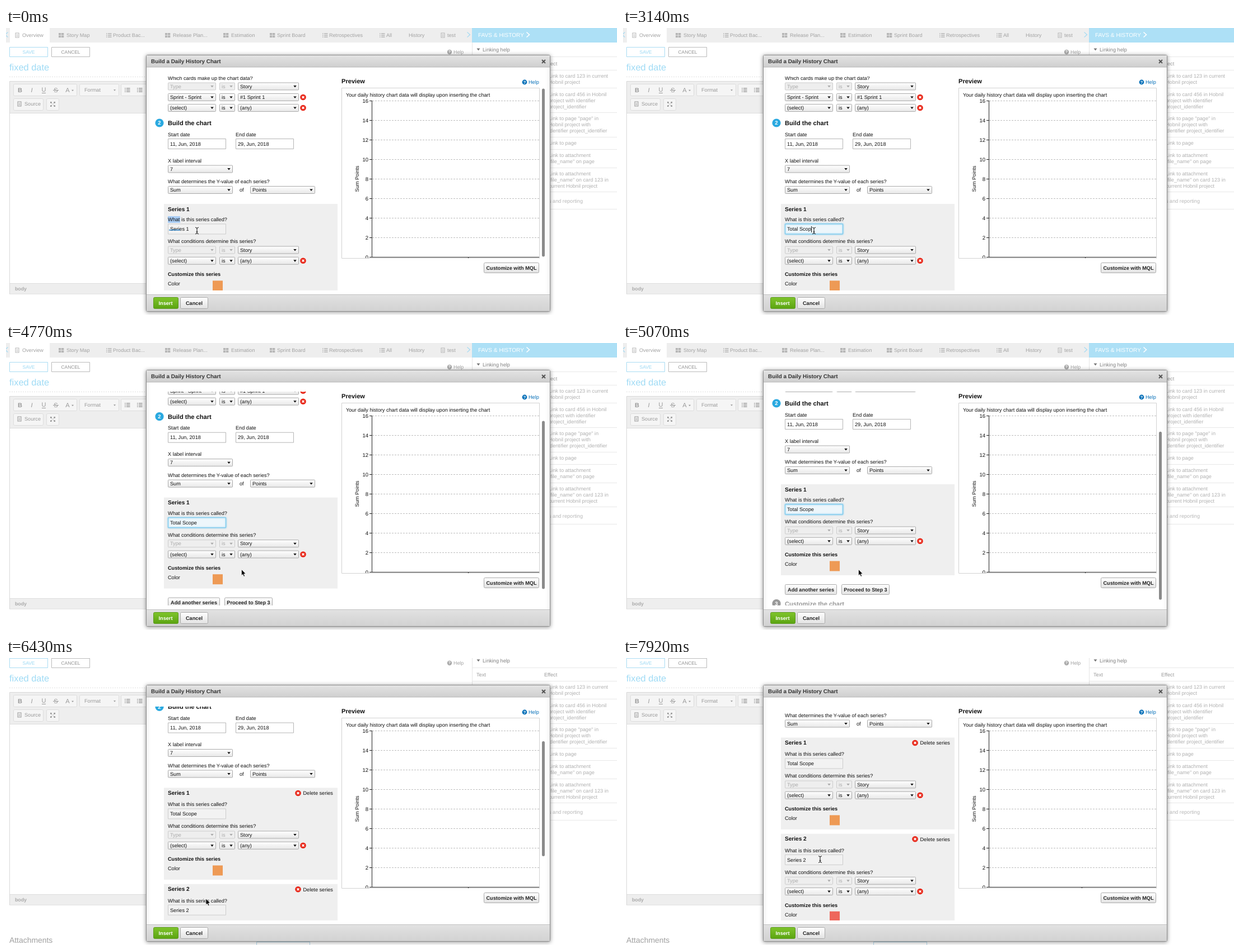
Write an HTML page with a canvas that moves like this. It is 1091 by 514 pixels and loops after 8 s.

```html
<!DOCTYPE html>
<html lang="en">
<head>
<meta charset="utf-8">
<title>Daily history chart builder</title>
<style>
html, body { margin: 0; width: 100%; height: 100%; overflow: hidden; background: #fff; }
canvas { display: block; width: 1091px; height: 514px; }
</style>
</head>
<body>
<canvas id="stage"></canvas>
<script>
const W = 1091, H = 514, LOOP = 8000;
const canvas = document.getElementById('stage');
const dpr = window.devicePixelRatio || 1;
canvas.width = W * dpr;
canvas.height = H * dpr;
const c = canvas.getContext('2d');
const FACE = '"Liberation Sans", Arial, sans-serif';
const SIZE = 9.17, TOOL = 'Hobnil';

// Step tracks: [time, value...]; each value holds until the next time.
const SCROLL = [[0, 0], [4180, 24.5], [4330, 32], [4470, 36.5], [4770, 38.3], [4920, 48], [5070, 62],
  [5220, 71], [5520, 73.7], [6430, 82.5], [6580, 104], [6730, 134], [6880, 159], [7030, 172.5]];
const BAR = [[0, 1], [150, .5], [330, 0], [4180, 1], [5670, .6], [5820, .25], [5970, 0],
  [6430, 1], [7320, .6], [7470, .25], [7620, 0]];
const NAME = [[0, 'Series 1'], [1520, 'T'], [1820, 'Tot'], [2110, 'Tota'], [2250, 'Total'], [2400, 'Total '],
  [2700, 'Total S'], [2990, 'Total Sc'], [3140, 'Total Scop'], [3290, 'Total Scope']];
const CARET = [[0, 0], [330, 1], [620, 0], [1520, 1], [3580, 0], [5520, 1], [6130, 0]];
const POINTER = [[0, 341, 363, 'beam'], [3580, 362, 382, 'arrow'], [3730, 400, 400, 'arrow'],
  [3880, 420.5, 405.5, 'arrow'], [5820, 402, 414, 'arrow'], [5970, 370, 427, 'arrow'], [6130, 357, 431, 'arrow'],
  [7170, 357, 416, 'arrow'], [7320, 357, 390, 'arrow'], [7470, 357, 365, 'arrow'], [7620, 357, 353, 'arrow'],
  [7770, 352, 359, 'beam'], [7920, 352, 360.5, 'beam']];

function held(track, t) {
  let key = track[0];
  for (const k of track) if (k[0] <= t) key = k;
  return key.slice(1);
}

// y is the middle of the line
function text(s, x, y, { size = SIZE, color = '#111', bold = false, align = 'left' } = {}) {
  c.font = `${bold ? 'bold ' : ''}${size}px ${FACE}`;
  c.fillStyle = color;
  c.textAlign = align;
  c.fillText(s, x, y + size * .35);
}

function fill(x, y, w, h, color) {
  c.fillStyle = color;
  c.fillRect(x, y, w, h);
}

function line(x1, y1, x2, y2, color, width = 1, dash = []) {
  c.strokeStyle = color;
  c.lineWidth = width;
  c.setLineDash(dash);
  c.beginPath();
  c.moveTo(x1, y1);
  c.lineTo(x2, y2);
  c.stroke();
  c.setLineDash([]);
}

function box(x, y, w, h, color, border, r = 0) {
  c.beginPath();
  c.roundRect(x + .5, y + .5, w - 1, h - 1, r);
  c.fillStyle = color;
  c.fill();
  c.strokeStyle = border;
  c.lineWidth = 1;
  c.stroke();
}

function shade(y, h, top, bottom) {
  const g = c.createLinearGradient(0, y, 0, y + h);
  g.addColorStop(0, top);
  g.addColorStop(1, bottom);
  return g;
}

function disc(x, y, r, color) {
  c.fillStyle = color;
  c.beginPath();
  c.arc(x, y, r, 0, 7);
  c.fill();
}

function triangle(x, y, w, h, color) {
  c.fillStyle = color;
  c.beginPath();
  c.moveTo(x - w / 2, y - h / 2);
  c.lineTo(x + w / 2, y - h / 2);
  c.lineTo(x, y + h / 2);
  c.fill();
}

function cross(x, y, r, color, width) {
  line(x - r, y - r, x + r, y + r, color, width);
  line(x - r, y + r, x + r, y - r, color, width);
}

function chevron(x, y, dir, color, width = 1.3) {
  c.strokeStyle = color;
  c.lineWidth = width;
  c.beginPath();
  c.moveTo(x - 2.5 * dir, y - 4.5);
  c.lineTo(x + 2.5 * dir, y);
  c.lineTo(x - 2.5 * dir, y + 4.5);
  c.stroke();
}

function badge(x, y, r, mark, color, size) {
  disc(x, y, r, color);
  text(mark, x, y, { size, color: '#fff', bold: true, align: 'center' });
}

function remove(x, y) {
  disc(x, y, 5.3, '#e8281a');
  cross(x, y, 1.9, '#fff', 1.5);
}

function button(label, x, y, w, h) {
  box(x, y, w, h, shade(y, h, '#fff', '#e2e2e2'), '#aaa', 2);
  text(label, x + w / 2, y + h / 2, { bold: true, align: 'center', color: '#222' });
}

function select(label, x, y, w, off = false) {
  box(x, y - 7, w, 14, off ? '#eee' : shade(y - 7, 14, '#fff', '#e7e7e7'), off ? '#ccc' : '#aaa', 1);
  const color = off ? '#aaa' : '#111';
  text(label, x + 4, y, { color });
  triangle(x + w - 7, y + .3, 5.5, 3.6, color);
}

function input(label, x, y, border = '#b5b5b5', color = '#fff') {
  box(x, y - 9.5, 104, 19, color, border);
  text(label, x + 4, y);
}

function condition(y, kind, value, off, removable) {
  select(kind, 289, y, 86, off);
  select('is', 381, y, 28, off);
  select(value, 414, y, 109);
  if (removable) remove(530.5, y);
}

function icon(kind, x, y, color) {
  if (kind === 'doc') {
    c.strokeStyle = color;
    c.lineWidth = 1;
    c.strokeRect(x + 1, y - 4, 6, 8);
    line(x + 2.5, y - 1, x + 5.5, y - 1, color);
    line(x + 2.5, y + 1.5, x + 5.5, y + 1.5, color);
  } else if (kind === 'grid') {
    for (const dx of [0, 5]) for (const dy of [-4, .5]) fill(x + dx, y + dy, 4.3, 3.6, color);
  } else if (kind === 'list') {
    for (const dy of [-3, 0, 3]) {
      fill(x, y + dy - .7, 1.6, 1.5, color);
      fill(x + 3, y + dy - .7, 6.5, 1.5, color);
    }
  }
}

function tabs() {
  fill(0, 0, 832, 26, '#eee');
  fill(7, 0, 71, 26, '#fff');
  chevron(1, 12, -1, '#a9dcf3');
  chevron(826, 12, 1, '#a9dcf3');
  const items = [['doc', 16, 29, 'Overview'], ['grid', 94, 108, 'Story Map'], ['list', 179, 191, 'Product Bac...'],
    ['grid', 284, 298, 'Release Plan...'], ['grid', 388, 402, 'Estimation'], ['grid', 471, 484, 'Sprint Board'],
    ['list', 565, 577, 'Retrospectives'], ['list', 667, 679, 'All'], ['', 0, 719, 'History'], ['doc', 776, 788, 'test']];
  for (const [kind, ix, x, label] of items) {
    icon(kind, ix, 13, '#b5b5b5');
    text(label, x, 13, { size: 9.1, color: '#a2a2a2' });
  }
}

function editor() {
  const gray = '#999';
  box(6, 95, 820, 382, '#fff', '#d8d8d8');
  fill(7, 96, 818, 57, '#eee');
  line(7, 152.5, 825, 152.5, '#ddd');
  for (const [x, y, w] of [[13, 100, 114], [131, 100, 71], [205, 100, 60], [13, 126, 54], [72, 126, 23]])
    box(x, y, w, 22, '#f5f5f5', '#ddd', 2);
  text('B', 25, 111, { size: 11, bold: true, color: gray, align: 'center' });
  c.font = `italic 11px ${FACE}`;
  c.fillText('I', 46, 115);
  text('U', 67.5, 110.5, { size: 11, color: gray, align: 'center' });
  line(64, 116.5, 71, 116.5, gray);
  text('S', 89, 111, { size: 11, color: gray, align: 'center' });
  line(84, 111.5, 94, 111.5, gray);
  text('A', 110, 111, { size: 11, color: gray, align: 'center' });
  triangle(119, 112, 4, 2.5, gray);
  text('Format', 140, 111, { color: gray });
  triangle(194, 111.5, 4, 2.5, gray);
  icon('list', 212, 111, gray);
  icon('list', 234, 111, gray);
  icon('doc', 20, 136, gray);
  text('Source', 33, 136, { color: gray });
  for (const sx of [-1, 1]) for (const sy of [-1, 1]) {
    line(83.5 + sx, 136.5 + sy, 83.5 + 4 * sx, 136.5 + 4 * sy, gray);
    fill(83.5 + 3.2 * sx - 1.3, 136.5 + 3.2 * sy - 1.3, 2.6, 2.6, gray);
  }
  fill(7, 457, 818, 19.5, '#eee');
  line(7, 457.5, 825, 457.5, '#ddd');
  text('body', 16, 467, { bold: true, color: '#aaa', size: 8.8 });
}

function sidebar() {
  fill(832, 0, 259, 26, '#ade0f6');
  text('FAVS & HISTORY', 843, 12.5, { size: 10.1, color: '#fff' });
  chevron(932, 12, 1, '#fff', 1.6);
  line(832.5, 26, 832.5, 324, '#e4e4e4');
  triangle(843.5, 38.5, 6, 4, '#777');
  text('Linking help', 851, 38.5, { color: '#808080' });
  text('Text', 840, 63.5, { color: '#999' });
  text('Effect', 961, 63.5, { color: '#999' });
  for (const y of [51, 75, 107, 151, 195, 217, 250, 293, 324]) line(833, y + .5, W, y + .5, '#e8e8e8');
  const notes = [[86, 'Link to card 123 in current', `${TOOL} project`],
    [119, `Link to card 456 in ${TOOL}`, 'project with identifier', 'project_identifier'],
    [162, 'Link to page "page" in', `${TOOL} project with`, 'identifier project_identifier'],
    [206, 'Link to page'], [228, 'Link to attachment', '"file_name" on page'],
    [261, 'Link to attachment', '"file_name" on card 123 in', `current ${TOOL} project`]];
  for (const [y, ...lines] of notes)
    lines.forEach((s, i) => text(s, 969, y + i * 10.8, { color: '#b0b0b0' }));
  text('Charts and reporting', 1030, 310, { color: '#b8b8b8', align: 'right' });
}

function page() {
  tabs();
  box(6, 34, 69, 18, '#fff', '#a9dcf3');
  text('SAVE', 40.5, 43, { size: 8.5, color: '#9bd8f3', align: 'center' });
  box(81, 34, 69, 18, '#fff', '#bbb');
  text('CANCEL', 115.5, 43, { size: 8.4, color: '#929292', align: 'center' });
  badge(792, 43, 4.2, '?', '#aaa', 7);
  text('Help', 799, 43, { size: 8.9, color: '#a2a2a2' });
  text('fixed date', 6, 70, { size: 16.4, color: '#9fdbf5' });
  line(6, 87.5, 832, 87.5, '#e0e0e0', 1, [2, 2]);
  editor();
  sidebar();
  text('Attachments', 6, 539, { size: 13.9, color: '#a0a0a0' });
  box(447, 542, 96, 20, '#fff', '#b5d9ec');
}

function series(n, y, name, color, s) {
  const extra = s.added ? 1.5 : 0;
  fill(282, y - 9, 310, 163 + extra, '#efefef');
  text(`Series ${n}`, 289, y, { size: 10.1, bold: true });
  if (s.added) {
    remove(521.5, y + .5);
    text('Delete series', 530.5, y + .5);
  }
  y += extra;
  const focus = n === 1 && s.focus;
  if (n === 1 && s.t < 150) fill(289, y + 13, 22, 12, '#a9cdf5');
  text('What is this series called?', 289, y + 19);
  if (focus) {
    c.shadowColor = '#6cc5ee';
    c.shadowBlur = 3 * dpr;
  }
  box(289, y + 26.5, 104, 19, focus ? '#edf6fb' : '#f2f2f2', focus ? '#74c6ec' : '#ccc');
  c.shadowBlur = 0;
  c.shadowColor = 'transparent';
  if (focus && s.t >= 920 && s.t < 1520) fill(293, y + 31, 34, 11, '#a9cdf5');
  text(name, 293, y + 36);
  if (n === 1 && s.t < 150) fill(291, y + 37, 20, 1.6, '#3c8fd0');
  if (focus && s.caret) fill(Math.round(293 + c.measureText(name).width), y + 31, 1, 11, '#111');
  text('What conditions determine this series?', 289, y + 58);
  condition(y + 73.5, 'Type', 'Story', true, false);
  condition(y + 92.8, '(select)', '(any)', false, true);
  text('Customize this series', 289, y + 117, { bold: true });
  text('Color', 289, y + 134);
  fill(369, y + 128.5, 18, 18, color);
}

function form(s) {
  c.save();
  c.beginPath();
  c.rect(262, 87, 331, 383);
  c.clip();
  c.translate(0, -s.scroll);
  text('Which cards make up the chart data?', 289, 90);
  condition(104.5, 'Type', 'Story', true, false);
  condition(124, 'Sprint - Sprint', '#1 Sprint 1', false, true);
  condition(143, '(select)', '(any)', false, true);
  badge(274, 170, 7.6, '2', '#2aa9e0', 9.5);
  text('Build the chart', 289, 170, { size: 11.1, bold: true });
  text('Start date', 289, 190.5);
  text('End date', 410, 190.5);
  input('11, Jun, 2018', 289, 207.5);
  input('29, Jun, 2018', 410, 207.5);
  text('X label interval', 289, 237.5);
  select('7', 289, 252.5, 116);
  text('What determines the Y-value of each series?', 289, 275);
  select('Sum', 289, 290, 116);
  text('of', 417, 290);
  select('Points', 436, 290, 116);
  series(1, 324, s.name, '#ee9a55', s);
  if (s.added) series(2, 496.3, 'Series 2', '#ee675c', s);
  const y = s.added ? 174 : 0;
  button('Add another series', 289, 494 + y, 93, 19);
  button('Proceed to Step 3', 390, 494 + y, 86, 19);
  badge(274, 528.7 + y, 7.6, '3', '#999', 9.5);
  text('Customize the chart', 289, 528.7 + y, { size: 11.1, bold: true, color: '#999' });
  c.restore();
}

function preview(s) {
  text('Preview', 599, 95, { size: 11.1, bold: true });
  badge(926, 97, 4.4, '?', '#0b72b9', 7.5);
  text('Help', 933, 97, { color: '#0b72b9' });
  box(599, 107, 354, 306, '#fff', '#d2d2d2');
  text('Your daily history chart data will display upon inserting the chart', 607, 120);
  c.save();
  c.beginPath();
  c.rect(600, 108, 352, 304);
  c.clip();
  for (let v = 0; v <= 16; v += 2) {
    const y = Math.round(410 - v * 17.5) + .5;
    if (v) line(654, y, 952, y, '#bdbdbd', 1, [3, 2]);
    line(649, y, 653, y, '#222');
    text(String(v), 647, y, { size: 9.5, align: 'right' });
  }
  line(653.5, 130, 653.5, 411, '#222');
  line(653, 410.5, 952, 410.5, '#222');
  const x = s.t < 6580 ? 825.5 : 819.5;
  line(x, 410, x, 412, '#222');
  c.translate(627, 270);
  c.rotate(-Math.PI / 2);
  text('Sum Points', 0, 0, { align: 'center' });
  c.restore();
  button('Customize with MQL', 853, 420, 99, 19);
}

function dialog(s) {
  c.save();
  c.shadowColor = 'rgba(0,0,0,.4)';
  c.shadowBlur = 7 * dpr;
  c.shadowOffsetY = dpr;
  box(250, 48, 722, 460, '#fff', '#8c8c8c', 2);
  c.restore();
  fill(251, 49, 720, 21, shade(49, 21, '#e3e3e3', '#cfcfcf'));
  line(251, 70, 971, 70, '#b5b5b5');
  text('Build a Daily History Chart', 259, 59.5, { size: 9.9, bold: true, color: '#333' });
  cross(960, 60, 3, '#555', 2);
  fill(251, 477, 720, 30, shade(477, 30, '#e2e2e2', '#d2d2d2'));
  line(251, 477.5, 971, 477.5, '#c2c2c2');
  box(263, 482, 45, 21, shade(482, 21, '#80c52c', '#5aa311'), '#5a9a1b', 2);
  text('Insert', 285, 492.5, { bold: true, color: '#fff', align: 'center' });
  button('Cancel', 311, 482, 50, 21);
  preview(s);
  form(s);
}

function scrollbars(s) {
  c.globalAlpha = s.bar;
  c.fillStyle = '#8a8a8a';
  c.beginPath();
  if (s.added) c.roundRect(957, 149 + (s.scroll - 82.5) * .55, 5, 206, 2.5);
  else c.roundRect(957, 108.5 + s.scroll * .81, 5, 301, 2.5);
  c.fill();
  if (s.t >= 5520 && s.t < 5970) fill(1089.5, 68, 1.5, 395, '#888');
  c.globalAlpha = 1;
}

function pointer([x, y, kind]) {
  if (kind === 'beam') {
    line(x, y - 5, x, y + 5, '#111');
    for (const d of [-1, 1]) {
      line(x, y + 4.5 * d, x - 3, y + 6 * d, '#111');
      line(x, y + 4.5 * d, x + 3, y + 6 * d, '#111');
    }
    line(x - 1.5, y + 2, x + 1.5, y + 2, '#111');
    return;
  }
  c.beginPath();
  for (const [dx, dy] of [[0, 0], [0, 11], [2.4, 8.8], [4.2, 12.8], [6, 12], [4.3, 8.1], [7.6, 8]])
    c.lineTo(x + dx, y + dy);
  c.closePath();
  c.fillStyle = '#000';
  c.fill();
  c.strokeStyle = '#fff';
  c.lineWidth = .7;
  c.stroke();
}

function draw(t) {
  const s = {
    t,
    scroll: held(SCROLL, t)[0],
    bar: held(BAR, t)[0],
    name: held(NAME, t)[0],
    caret: held(CARET, t)[0],
    focus: t >= 150 && t < 6130,
    added: t >= 6280
  };
  c.setTransform(dpr, 0, 0, dpr, 0, 0);
  c.textRendering = 'geometricPrecision';
  fill(0, 0, W, H, '#fff');
  c.save();
  if (t >= 5520) c.translate(0, -34);
  page();
  c.restore();
  dialog(s);
  scrollbars(s);
  pointer(held(POINTER, t));
}

const start = performance.now();
function tick() {
  draw((performance.now() - start) % LOOP);
  requestAnimationFrame(tick);
}
tick();
</script>
</body>
</html>
```
